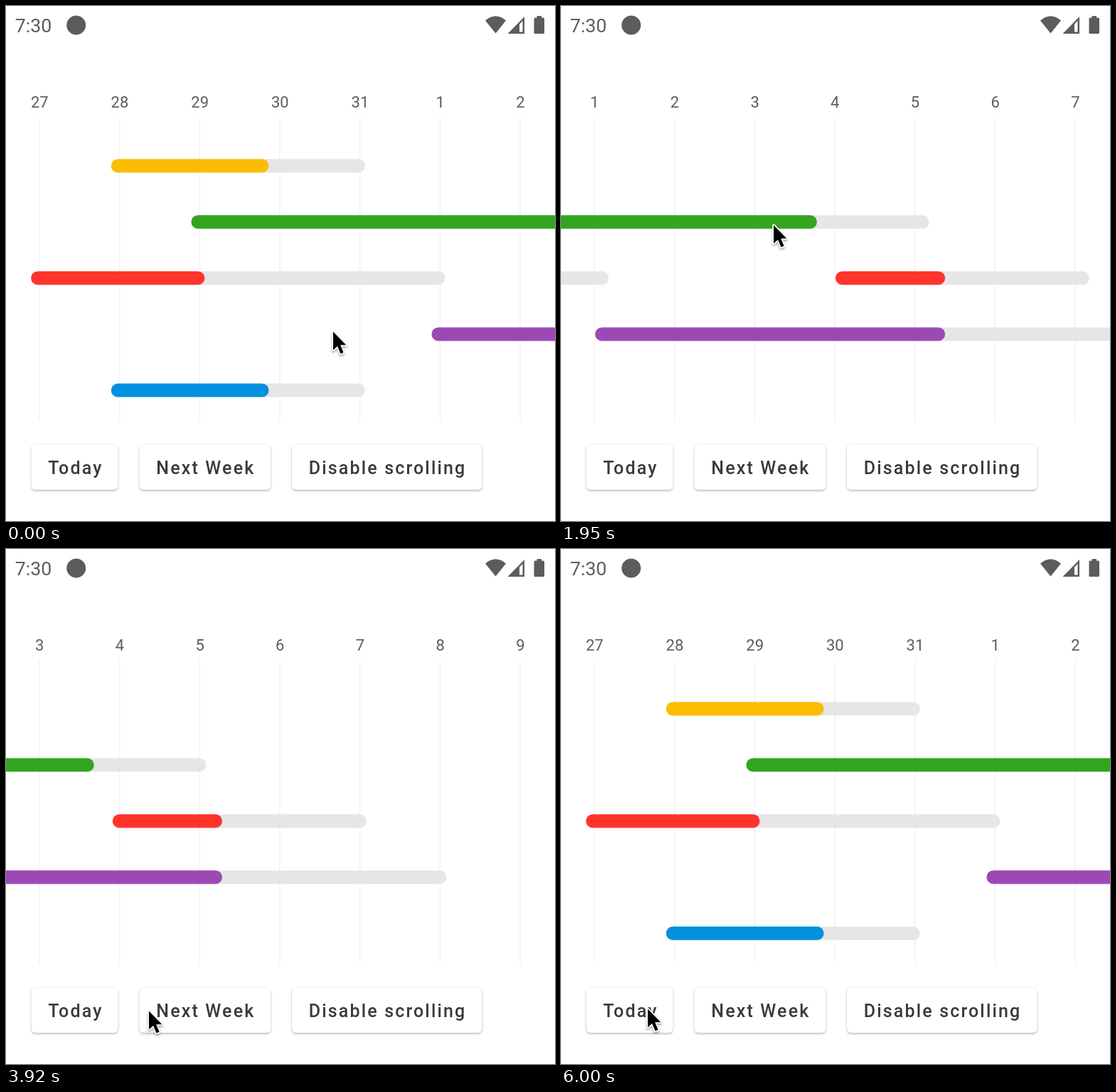
An HTML page that plays this animation: 772x725 px, repeating every 6.05 s.

```html
<!DOCTYPE html>
<html lang="en">
<head>
<meta charset="utf-8">
<title>Timeline</title>
<style>
  html, body { margin: 0; width: 100%; height: 100%; overflow: hidden; background: #fff; }
  svg { display: block; width: 772px; height: 725px; font-family: Roboto, sans-serif; }
  .status { fill: #5c5c5c; }
  .days { font-size: 22px; fill: #5c5c5c; text-anchor: middle; }
  .bars { stroke-width: 19px; stroke-linecap: round; }
  .buttons rect { fill: #fff; filter: drop-shadow(0 2px 1.5px rgba(0,0,0,.2)) drop-shadow(0 0 1px rgba(0,0,0,.12)); }
  .buttons text { font-size: 25px; font-weight: 500; letter-spacing: 2.14px; fill: #3a3a3a; }
  #cursor { filter: drop-shadow(0 2px 1.5px rgba(0,0,0,.35)); }
</style>
</head>
<body>
<svg viewBox="0 0 772 725">
  <g class="status">
    <text x="12.7" y="37" font-size="26.7">7:30</text>
    <circle cx="98.7" cy="27" r="13.5"/>
    <path d="M674 20.5Q688.5 8 703 20.5L688.5 38.5Z"/>
    <path fill-rule="evenodd" d="M705.5 39L729 15V39ZM722 25.5V36.5H726.5V21Z"/>
    <path d="M746.5 14h6.5v2.500h2.500q1.500 0 1.500 1.500v19.500q0 1.500-1.500 1.500h-11.500q-1.500 0-1.500-1.500v-19.500q0-1.500 1.500-1.500h2.500Z"/>
  </g>
  <g id="lines" stroke="#f4f4f4" stroke-width="1.8"></g>
  <g id="days" class="days"></g>
  <g id="bars" class="bars"></g>
  <g id="buttons" class="buttons"></g>
  <path id="cursor" d="M0 0V26L6 20.500L10.500 31L14.600 29.300L10.200 18.800H18.300Z"
        stroke="#fff" stroke-width="3.5" stroke-linejoin="round" paint-order="stroke"/>
</svg>
<script>
const LOOP = 6050, DAY = 112.67, LEFT = 47;
const $ = id => document.getElementById(id);

function add(parent, tag, attrs, text = '') {
  const el = document.createElementNS('http://www.w3.org/2000/svg', tag);
  for (const k in attrs) el.setAttribute(k, attrs[k]);
  el.textContent = text;
  return parent.appendChild(el);
}

const labels = [];
for (let i = 0; i < 7; i++) {
  const x = LEFT + DAY * i;
  add($('lines'), 'path', { d: `M${x} 157V584` });
  labels.push(add($('days'), 'text', { x: x + .3, y: 143.2 }));
}

// A task lasts whole days; part of it is done
function task(row, start, days, done, color) {
  const x = LEFT - 2.4 + DAY * start, y = 225 + 79 * row;
  const line = (length, stroke) => add($('bars'), 'path', { d: `M${x} ${y}h${DAY * length}`, stroke });
  line(days, '#e6e6e6');
  line(days * done, color);
}
task(0, 1, 3, .6, '#fbbd02');
task(1, 2, 7, .8, '#33a521');
task(2, 0, 5, .4, '#ff342b');
task(2, 8, 3, .4, '#ff342b');
task(3, 5, 7, .6, '#9d49b5');
task(4, 1, 3, .6, '#0390df');

function button(x, width, name) {
  add($('buttons'), 'rect', { x, y: 617.5, width, height: 63.5, rx: 6 });
  add($('buttons'), 'text', { x: x + 23.8, y: 659 }, name);
}
button(35.5, 122, 'Today');
button(187.5, 185, 'Next Week');
button(402, 267.5, 'Disable scrolling');

// [time, days]: swipe on, swipe back, "Next Week", "Today" with overshoot
const scroll = [[0, 0], [1684, 4.886], [1950, 4.886], [3150, -.22], [3400, -.22],
  [3970, 7], [4330, 7], [5110, -.37], [6000, 0]];
// [time, x, y]
const pointer = [[0, 459, 457], [1120, 295, 416], [1950, 298, 307], [2450, 560, 400],
  [3150, 332, 536], [3400, 200, 649], [4000, 200, 649], [4300, 121, 646]];

// Values between the keys around t, eased in and out
function tween(keys, t) {
  const next = keys.findIndex(k => k[0] > t);
  if (next < 0) return keys[keys.length - 1].slice(1);
  const a = keys[next - 1], b = keys[next], u = (t - a[0]) / (b[0] - a[0]);
  const e = u < .5 ? 4 * u ** 3 : 1 - 4 * (1 - u) ** 3;
  return a.slice(1).map((v, i) => v + (b[i + 1] - v) * e);
}

function draw(t) {
  const [day] = tween(scroll, t), [x, y] = tween(pointer, t);
  const first = Math.floor(day + .32);
  labels.forEach((el, i) => el.textContent = (26 + first + i) % 31 + 1);
  $('bars').setAttribute('transform', `translate(${-day * DAY})`);
  $('cursor').setAttribute('transform', `translate(${x + 1} ${y + 1.5})`);
}

const begin = performance.now();
function tick() {
  draw((performance.now() - begin) % LOOP);
  requestAnimationFrame(tick);
}
tick();
</script>
</body>
</html>
```
